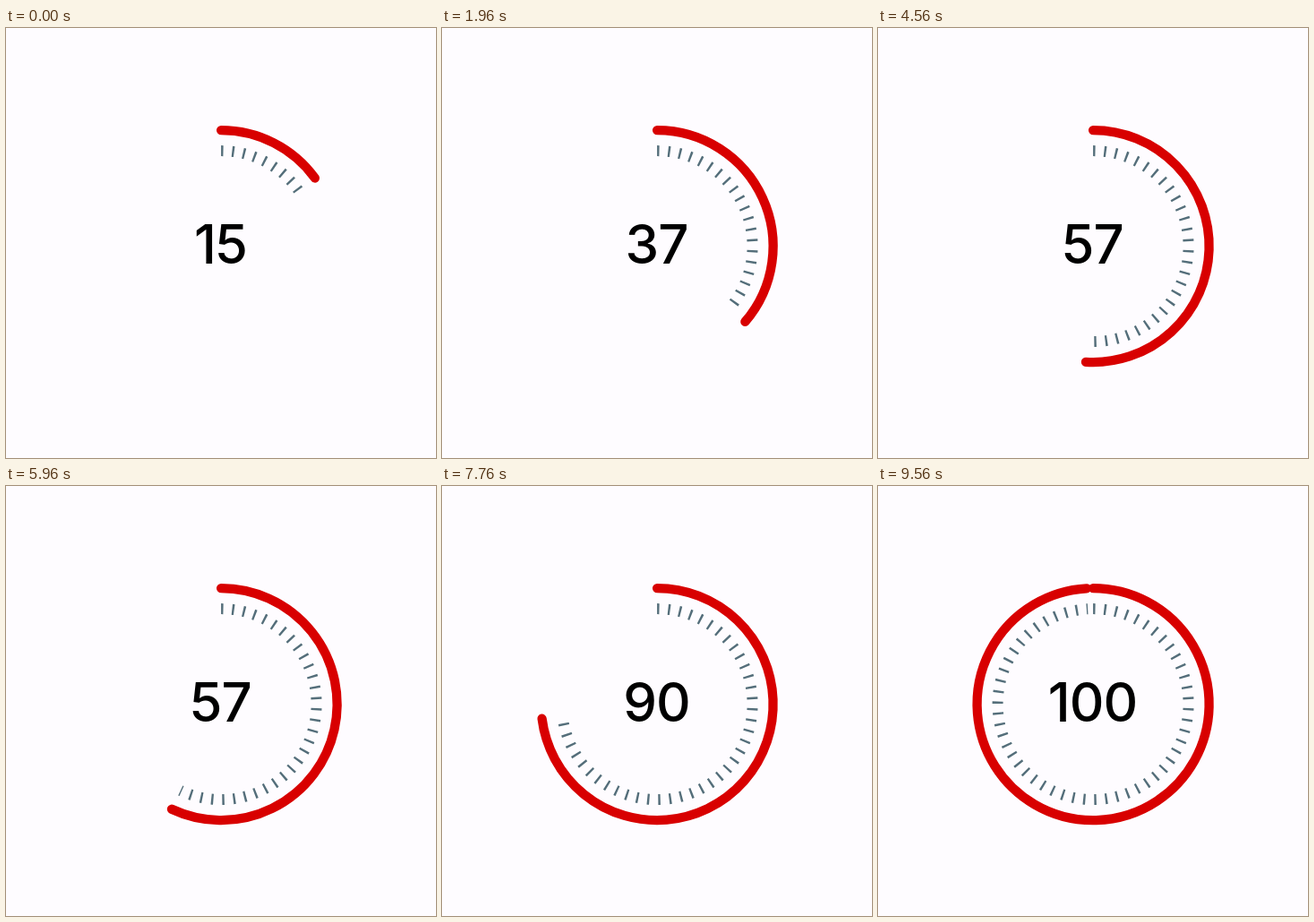
Recreate the animation shown at these times as an HTML page. Size 480 by 480 pixels, loop 9.6 s.

```html
<!DOCTYPE html>
<html lang="en">
<head>
<meta charset="utf-8">
<title>Progress ring</title>
<style>
  html, body { margin: 0; width: 100%; height: 100%; overflow: hidden; background: #fefcff; }
  svg { display: block; width: 100vw; height: 100vh; }
  path { fill: none; }
  text { font: 500 60px Inter, "Open Sans", sans-serif; letter-spacing: -1px; text-anchor: middle; }
</style>
</head>
<body>
<svg viewBox="0 0 480 480">
  <path id="ticks" stroke="#546e7a" stroke-width="12"/>
  <path id="ring" stroke="#d80000" stroke-width="10.3" stroke-linecap="round"/>
  <text id="label" x="239.5" y="262.5"></text>
</svg>
<script>
const LOOP = 9600, DELAY = 160, DURATION = 500;
const TICK_STEP = 6.594, TICK_WIDTH = 1.3;
const CX = 240.1, CY = 243.6;
const START = 15;
// [time the number changes, new value]
const STEPS = [[40, 29], [1480, 37], [3080, 51], [4560, 57], [6040, 73], [7600, 90], [9080, 100]];

const [ticks, ring, label] = ['ticks', 'ring', 'label'].map(id => document.getElementById(id));

// The CSS "ease" curve: cubic-bezier(.25, .1, .25, 1)
const bezier = (u, a, b) => 3 * u * (1 - u) ** 2 * a + 3 * u * u * (1 - u) * b + u ** 3;
function ease(x) {
  if (x <= 0) return 0;
  if (x >= 1) return 1;
  let lo = 0, hi = 1;
  for (let i = 0; i < 24; i++) {
    const mid = (lo + hi) / 2;
    if (bezier(mid, 0.25, 0.25) < x) lo = mid; else hi = mid;
  }
  return bezier(lo, 0.1, 1);
}

// Angles in degrees, clockwise from the top
function arc(r, from, to) {
  const point = deg => {
    const a = deg * Math.PI / 180;
    return `${CX + r * Math.sin(a)} ${CY - r * Math.cos(a)}`;
  };
  return `M${point(from)}A${r} ${r} 0 ${to - from > 180 ? 1 : 0} 1 ${point(to)}`;
}

function draw(time) {
  let value = START, progress = START;
  for (const [at, next] of STEPS) {
    if (time < at) break;
    progress = value + (next - value) * ease((time - at - DELAY) / DURATION);
    value = next;
  }
  const end = Math.min(progress * 3.6, 359.99);
  let marks = '';
  for (let a = 0; a < end; a += TICK_STEP) {
    marks += arc(106.5, a, Math.min(a + TICK_WIDTH, end));
  }
  ticks.setAttribute('d', marks);
  ring.setAttribute('d', arc(129.5, 0, end));
  label.textContent = value;
}

const origin = performance.now();
function frame() {
  draw((performance.now() - origin) % LOOP);
  requestAnimationFrame(frame);
}
frame();
</script>
</body>
</html>
```
